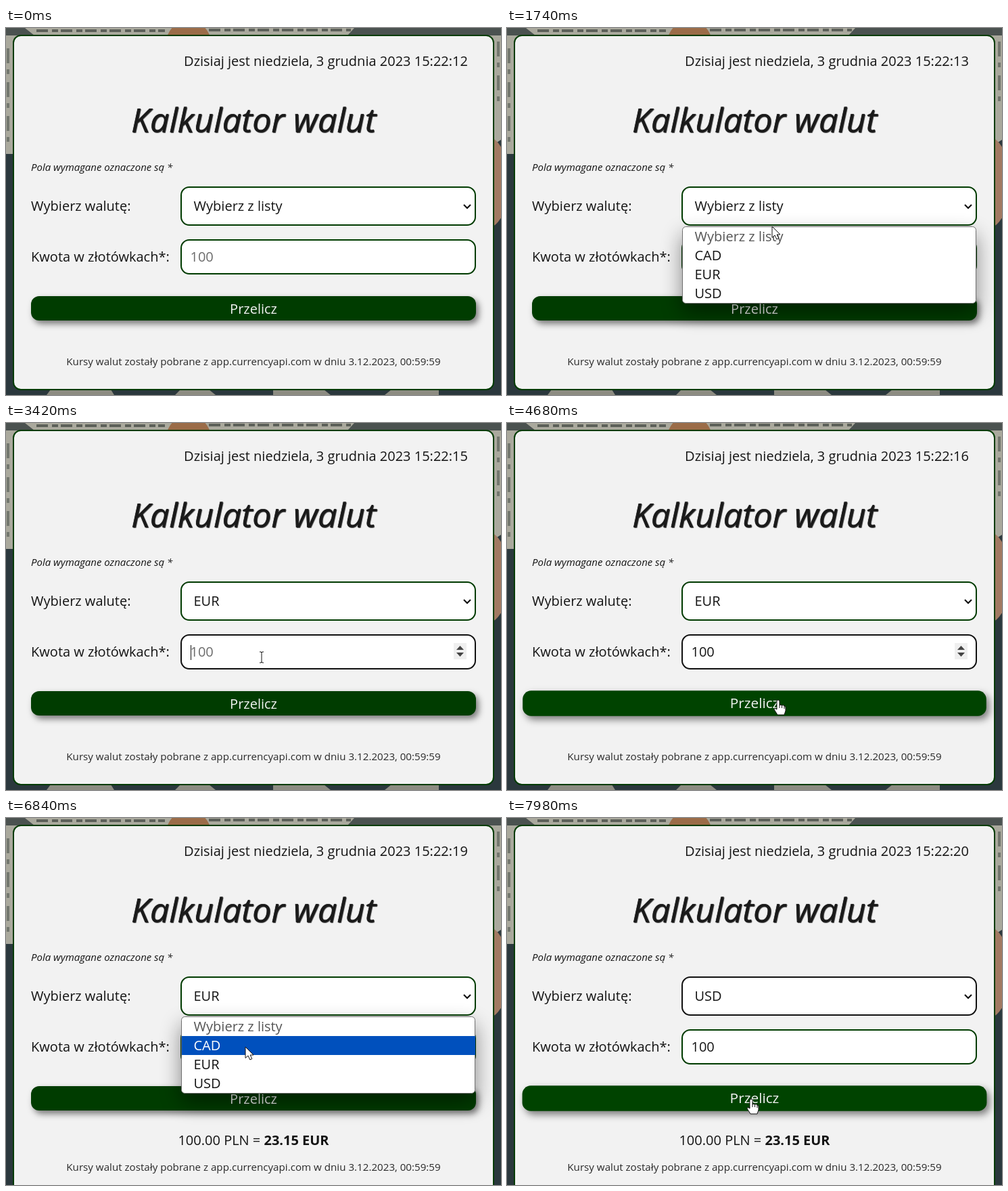
Recreate the animation shown at these times as an HTML page. Size 732 by 542 pixels, loop 8 s.

```html
<!DOCTYPE html>
<html lang="pl">
<head>
<meta charset="utf-8">
<title>Kalkulator walut</title>
<style>
  html, body { margin: 0; width: 100%; height: 100%; overflow: hidden; }
  svg { display: block; font: 20px "Open Sans", sans-serif; fill: #141414; }
  .mid { text-anchor: middle; }
  .field { fill: #fff; stroke: #003b00; stroke-width: 2; }
  .title { font-size: 50px; font-style: italic; text-shadow: 0 0 1px #1a1a1a, 1px 1px 1px #333; fill: #1a1a1a; }
  #bar { filter: drop-shadow(4px 5px 5px rgba(0, 0, 0, .5)); }
  #list > rect:first-child { filter: drop-shadow(0 13px 15px rgba(0, 0, 0, .45)); }
  #cursor path { fill: #fff; stroke: #111; stroke-width: 1; stroke-linejoin: round; }
</style>
</head>
<body>
<svg width="732" height="542" viewBox="0 0 732 542">
  <!-- banknotes and coins behind the card -->
  <rect width="732" height="542" fill="#2b383d"/>
  <path d="M0 0H732V165L700 186H0Z" fill="#aaa99d"/>
  <path d="M0 0H28L42 11H0ZM515 0H732V11H505Z" fill="#4b5250"/>
  <path d="M45 4H235M300 3H510" stroke="#5c6059" stroke-width="4" stroke-dasharray="17 6 9 4"/>
  <path d="M3 30V180M728 20V110" stroke="#73776e" stroke-width="4" stroke-dasharray="22 9 7 12"/>
  <circle cx="270" cy="22" r="33" fill="#9b6c48"/>
  <ellipse cx="712" cy="228" rx="32" ry="67" fill="#a27a62"/>
  <path d="M60 542L66 534H155L160 542ZM250 542L258 534H300L310 542ZM395 542V534H470L480 542ZM560 542L570 534H640V542Z" fill="#8d8c82"/>

  <rect id="card" x="11" y="11" width="710" height="523" rx="11" fill="#f2f2f2" stroke="#003b00" stroke-width="2"/>
  <text id="clock" class="mid" x="473" y="56"></text>
  <text class="mid title" x="366" y="153.500">Kalkulator walut</text>
  <text x="37" y="211" font-size="15" font-style="italic">Pola wymagane oznaczone są *</text>
  <text x="37" y="270">Wybierz walutę:</text>
  <text x="37" y="345">Kwota w złotówkach*:</text>

  <rect id="select" class="field" x="259" y="235" width="435" height="56" rx="12"/>
  <text id="choice" x="277.500" y="270"></text>
  <path d="M677 261L682 266L687 261" fill="none" stroke="#111" stroke-width="2.200"/>

  <rect id="input" class="field" x="259" y="313" width="435" height="50" rx="12"/>
  <text id="amount" x="272.500" y="345"></text>
  <rect id="caret" y="328" width="1" height="22"/>
  <g id="spinner">
    <rect x="662" y="325" width="19" height="24" fill="#efefef"/>
    <path d="M666 335L671.500 329L677 335ZM666 339H677L671.500 345Z" fill="#444"/>
  </g>

  <g id="button">
    <rect id="bar" x="37" y="396" width="658" height="36" rx="12"/>
    <text id="label" class="mid" x="366" y="422" fill="#f2f2f2">Przelicz</text>
  </g>

  <text id="result" class="mid" x="366" y="483">100.00 PLN = <tspan font-weight="700">23.15 EUR</tspan></text>
  <text id="footer" class="mid" x="366" font-size="15.150" fill="#2a2a2a">Kursy walut zostały pobrane z app.currencyapi.com w dniu 3.12.2023, 00:59:59</text>

  <g id="list">
    <rect x="259.500" y="293.500" width="434" height="113" rx="5" fill="#fff" stroke="#6f6f6f"/>
    <rect id="mark" x="260" width="434" height="28" fill="#0050bd"/>
  </g>

  <g id="cursor">
    <path id="arrow" d="M0 0V16.500L4 13L6.800 19L9.800 17.700L7.200 12H12Z"/>
    <path id="hand" d="M-2 2Q-2 0 0 0T2 2V8Q4 6.500 5.500 8Q8 7 9 9Q11 8.500 11 11V16Q10 19 9 22H-1Q-4 17 -6 14Q-6 11 -2 14ZM2 8V12M5.500 8V12M9 9V13"/>
    <path id="beam" d="M-3 -8H-1L0 -7L1 -8H3M0 -7V7M-3 8H-1L0 7L1 8H3" style="fill:none"/>
  </g>
</svg>
<script>
const $ = id => document.getElementById(id);
const show = (id, on) => $(id).setAttribute('visibility', on ? 'visible' : 'hidden');
const set = (id, name, value) => $(id).setAttribute(name, value);
const within = (t, from, to) => t >= from && t < to;
const clamp = v => Math.min(1, Math.max(0, v));

const LOOP = 8000, STEP = 60;
const OPTIONS = ['Wybierz z listy', 'CAD', 'EUR', 'USD'];
const PICK_EUR = 2640, FOCUS_INPUT = 3180, SUBMIT = 4980, PICK_USD = 7320;
const KEYS = [3480, 3660, 3840];
const HOVERS = [[4380, 5550], [7655, 9000]];

// Pointer stops: time, x, y
const STOPS = [
  [240, 560, 548], [960, 400, 265], [1440, 400, 265], [2280, 374, 361],
  [2700, 374, 361], [3120, 378, 346], [4080, 378, 346], [4560, 401, 409],
  [5480, 401, 409], [5700, 354, 289], [6120, 345, 263], [6360, 345, 263],
  [6840, 354, 338], [7200, 352, 388], [7560, 352, 390], [7860, 361, 415]
];

const rows = OPTIONS.map((name, i) => {
  const row = document.createElementNS('http://www.w3.org/2000/svg', 'text');
  row.setAttribute('x', 277.5);
  row.setAttribute('y', 315 + 28 * i);
  row.textContent = name;
  return $('list').appendChild(row);
});

function pointerAt(t) {
  const next = STOPS.findIndex(stop => stop[0] > t);
  if (next < 0) return STOPS.at(-1).slice(1);
  if (next === 0) return STOPS[0].slice(1);
  const [t0, x0, y0] = STOPS[next - 1], [t1, x1, y1] = STOPS[next];
  const p = (t - t0) / (t1 - t0), e = p * p * (3 - 2 * p);
  return [x0 + (x1 - x0) * e, y0 + (y1 - y0) * e];
}

const easeOut = p => 1 - (1 - clamp(p)) ** 2;
const hoverAt = t => Math.max(...HOVERS.map(([on, off]) =>
  easeOut((t - on) / 500) - easeOut((t - off) / 500)));

function draw(t) {
  const [x, y] = pointerAt(t);
  const open = within(t, 1380, PICK_EUR) || within(t, 6300, PICK_USD);
  const selected = t < PICK_EUR ? 0 : t < PICK_USD ? 2 : 3;
  const onInput = !open && y > 312 && y < 364;
  const onButton = HOVERS.some(([on, off]) => within(t, on, off));
  const inputFocus = within(t, FOCUS_INPUT, SUBMIT);
  const selectFocus = within(t, PICK_EUR, FOCUS_INPUT) || t >= PICK_USD;
  const done = t >= SUBMIT;

  $('clock').textContent =
    `Dzisiaj jest niedziela, 3 grudnia 2023 15:22:${12 + Math.floor((t + 200) / 1000)}`;
  $('choice').textContent = OPTIONS[selected];
  set('select', 'style', selectFocus ? 'stroke:#111' : '');
  set('input', 'style', inputFocus ? 'stroke:#111' : '');

  const typed = KEYS.filter(key => t >= key).length;
  $('amount').textContent = typed ? '100'.slice(0, typed) : '100';
  set('amount', 'fill', typed ? '#141414' : '#6c6c6c');
  set('caret', 'x', 273 + 11.4 * typed);
  show('caret', within(t, FOCUS_INPUT, 4380) && (t - FOCUS_INPUT) % 1000 < 500);
  show('spinner', inputFocus || onInput);

  const hover = hoverAt(t), scale = 1 + .05 * hover;
  set('button', 'transform', `translate(366 414) scale(${scale}) translate(-366 -414)`);
  set('label', 'y', 422 - 1.5 * clamp(hover * 3));
  set('bar', 'fill', hover > .7 ? '#004300' : '#003c00');

  show('result', done);
  set('card', 'height', done ? 546 : 523);
  set('footer', 'y', done ? 521 : 498);

  set('list', 'display', open ? 'inline' : 'none');
  const marked = y < 294 ? selected : Math.min(3, Math.floor((y - 294) / 28));
  set('mark', 'y', 294 + 28 * marked);
  set('mark', 'visibility', marked ? 'inherit' : 'hidden');
  rows.forEach((row, i) =>
    row.setAttribute('fill', !i ? '#555' : i === marked ? '#fff' : '#141414'));

  set('cursor', 'transform', `translate(${Math.round(x)} ${Math.round(y)})`);
  show('hand', onButton);
  show('beam', onInput && !onButton);
  show('arrow', t >= STOPS[0][0] && !onInput && !onButton);
}

const start = performance.now();
function tick() {
  const t = (performance.now() - start) % LOOP;
  draw(Math.floor(t / STEP) * STEP);
  requestAnimationFrame(tick);
}
tick();
</script>
</body>
</html>
```
